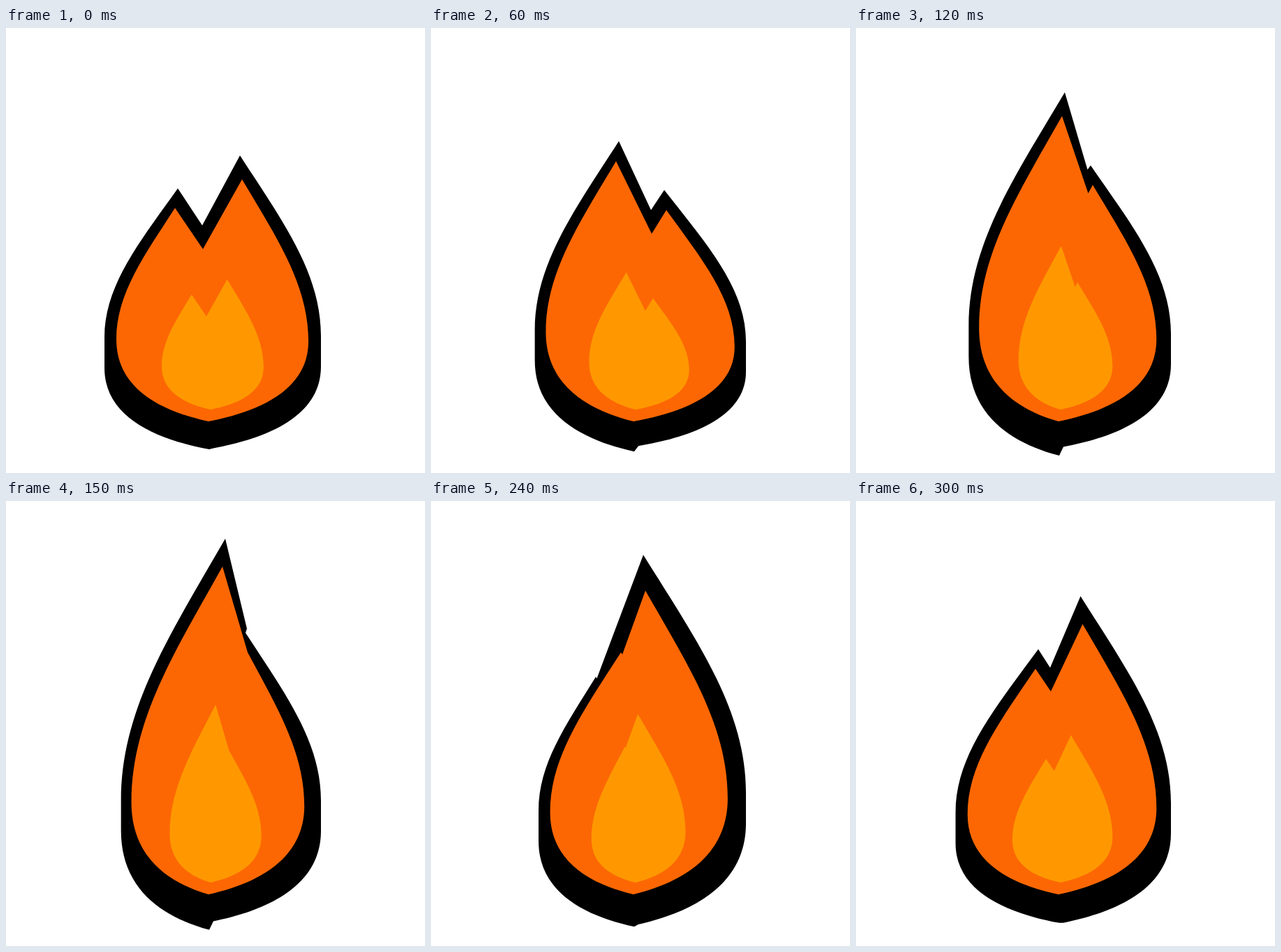
These frames come from a looping animation (600 px wide and 638 px high, 330 ms). An HTML page:

```html
<!DOCTYPE html>
<html lang="en">
<head>
<meta charset="utf-8">
<title>Flame</title>
<style>
  html, body { margin: 0; height: 100%; overflow: hidden; background: #fff; }
  svg { display: block; width: 600px; height: 638px; }
</style>
</head>
<body>
<svg viewBox="0 0 600 638">
  <path id="outline" fill="#000"/>
  <path id="body" fill="#fc6704"/>
  <path id="core" fill="#ff9800"/>
</svg>
<script>
const STEP = 30, STEPS = 11;

// A tongue is born on the left, rises to the top, then sinks on the right.
// It lives two loops, so a young and an old one always share the flame.
// Keys: age in steps, x, y
const tongue = [
  [0, 272, 211], [2, 272, 223], [4, 242, 258], [6, 265, 191], [9, 310, 94],
  [10, 306, 85], [11, 303, 121], [13, 311, 136], [15, 338, 217],
  [17, 337, 261], [18, 332, 233], [20, 346, 217], [21, 344, 150]
];
const gap = [
  [0, 272, 211], [2, 276, 229], [4, 282, 317], [6, 316, 295],
  [7, 319, 257], [9, 346, 217], [10, 344, 150]
];

function track(keys, age) {
  const i = keys.findLastIndex(key => key[0] <= age);
  const [t0, x0, y0] = keys[i];
  const [t1, x1, y1] = keys[i + 1] || [t0 + 1, x0, y0];
  const k = (age - t0) / (t1 - t0);
  return [x0 + (x1 - x0) * k, y0 + (y1 - y0) * k];
}

const add = ([x, y], [dx, dy]) => [x + dx, y + dy];

// Curves from a tip to the widest point, and from there to the base
const upper = ([tx, ty], [sx, sy]) => [
  [tx + (sx - tx) * 0.52, ty + (sy - ty) * 0.36],
  [sx, ty + (sy - ty) * 0.65],
  [sx, sy]
];
const lower = ([sx, sy], [bx, by]) => [
  [sx, sy + (by - sy) * 0.61],
  [bx + (sx - bx) * 0.5, by - (by - sy) * 0.12],
  [bx, by]
];

function flame({ left, valley, right, west, east, baseLeft, baseRight, drop = 0 }) {
  const [u1, u2] = upper(left, west);
  const westLow = add(west, [0, drop]);
  const [l1, l2] = lower(westLow, baseLeft);
  return `M${left}L${valley}L${right}` +
    `C${upper(right, east).join(" ")}v${drop}` +
    `C${lower(add(east, [0, drop]), baseRight).join(" ")}L${baseLeft}` +
    `C${l2} ${l1} ${westLow}L${west}C${u2} ${u1} ${left}Z`;
}

function makeBody(age, wave) {
  return {
    left: track(tongue, age),
    valley: track(gap, age),
    right: track(tongue, age + STEPS),
    west: [wave(169, -11, 0), wave(440, 10, 9.5)],
    east: [wave(429.5, 5.5, 1.5), wave(441, 16, 1.8)],
    baseLeft: [290, 564],
    baseRight: [290, 564]
  };
}

// The border is thickest above a tongue at its peak; a newborn notch sits lower
function makeOutline(body, age, wave) {
  const newborn = Math.max(0, 1 - (age / 3) ** 2);
  const border = (point, dx, dy, k) =>
    add(point, [dx + (-41 - dx) * k, dy + (43 - dy) * k]);
  const height = a => -28 - 24 * Math.exp(-(((a - 11.5) / 3) ** 2));
  return {
    left: border(body.left, 4, height(age), newborn),
    valley: border(body.valley, -1, -34, newborn),
    right: border(body.right, -3, height(age + STEPS), 0),
    west: [wave(153, -12, 10.9), body.west[1] - 3],
    east: [451, body.east[1] - 8],
    baseLeft: [291, wave(609.5, -5.5, 0)],
    baseRight: [297, wave(603, 4, 8)],
    drop: 44
  };
}

// The core is the body at about half size, its tips swaying up and left
function makeCore(body, wave) {
  const shrink = ([x, y]) => [293 + (x - 290) * 0.53, 547 + (y - 564) * 0.53];
  const core = {};
  for (const part in body) core[part] = shrink(body[part]);
  const sway = [wave(-3, -3, 7.5), wave(-5, -6, 7.5)];
  for (const part of ["left", "valley", "right"]) core[part] = add(core[part], sway);
  return core;
}

function show(id, shape) {
  document.getElementById(id).setAttribute("d", flame(shape));
}

function draw() {
  const step = Math.floor(performance.now() / STEP) % STEPS;
  const age = (step + 4) % STEPS;
  const wave = (middle, swing, peak) =>
    middle + swing * Math.cos((step - peak) / STEPS * 2 * Math.PI);
  const body = makeBody(age, wave);
  show("outline", makeOutline(body, age, wave));
  show("body", body);
  show("core", makeCore(body, wave));
  requestAnimationFrame(draw);
}
draw();
</script>
</body>
</html>
```
